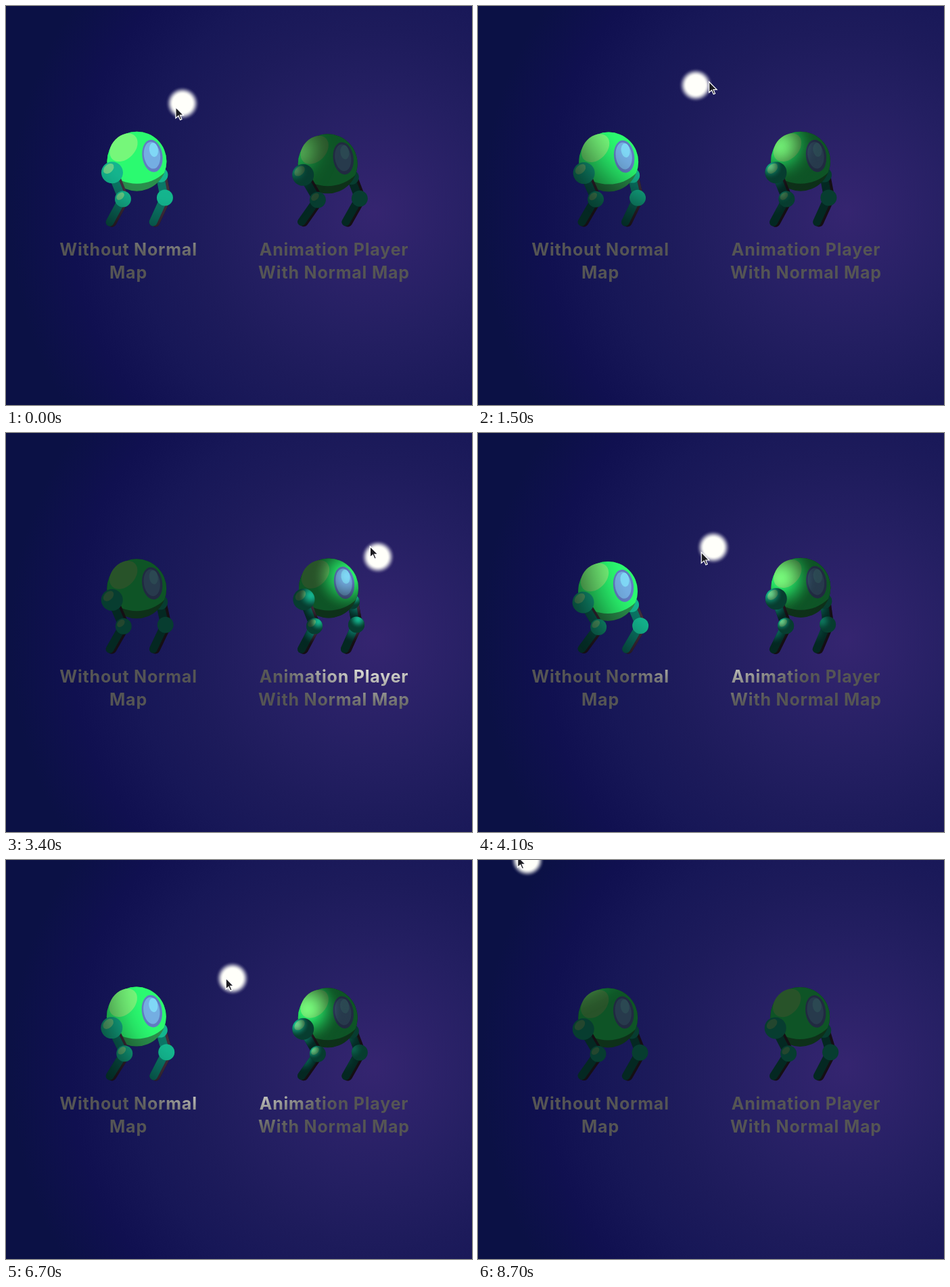
Animation, 689 px wide and 590 px high, one loop 8.8 s. Source, as an HTML page with a canvas:

```html
<!DOCTYPE html>
<html lang="en">
<head>
<meta charset="utf-8">
<title>Normal map light demo</title>
<style>
  html, body { margin: 0; width: 100%; height: 100%; overflow: hidden; background: #0b1145; }
  canvas { display: block; }
</style>
</head>
<body>
<canvas id="stage" width="689" height="590"></canvas>
<script>
const W = 689, H = 590, LOOP = 8800, STEP = 100;
const AMBIENT = .335, LEAD = .045;
const stage = document.getElementById('stage').getContext('2d');
const makeLayer = () => Object.assign(document.createElement('canvas'), { width: W, height: H }).getContext('2d');
const backdrop = makeLayer(), litLayer = makeLayer();

// Colours in full light; shadow is the same colour times AMBIENT
const MAT = {
  body: [43, 250, 112],
  shine: [118, 247, 122],
  belly: [42, 142, 76],
  rim: [98, 124, 194],
  glass: [116, 174, 226],
  glint: [128, 216, 246],
  joint: [20, 181, 142],
  spot: [104, 208, 136],
  leg: [11, 118, 102],
  shade: [64, 46, 60],
  text: [255, 255, 250]
};

// Turning points of the light: seconds, x, y
const PATH = [
  [0, 261, 144], [.9, 70, 255], [1.5, 322, 117], [1.9, 490, 125], [2.6, 613, 279],
  [3.1, 610, 270], [3.7, 470, 105], [4.1, 348, 169], [4.6, 150, 240], [5.3, 358, 111],
  [6, 588, 180], [6.45, 310, 215], [6.7, 335, 175], [7.4, 130, 200], [8, 310, 80], [8.7, 73, 0]
];

const smooth = (from, to, v) => {
  const u = Math.min(1, Math.max(0, (v - from) / (to - from)));
  return u * u * (3 - 2 * u);
};
const rgb = c => `rgb(${c.join(',')})`;
const white = a => `rgba(255,255,250,${a})`;
const shaded = (m, k) => rgb(MAT[m].map(v => Math.round(v * (AMBIENT + (1 - AMBIENT) * k))));

function slope(i, k) {
  const a = PATH[Math.max(i - 1, 0)], b = PATH[Math.min(i + 1, PATH.length - 1)];
  return (b[k] - a[k]) / (b[0] - a[0]);
}

function alongPath(t) {
  let i = 0;
  while (i < PATH.length - 2 && t >= PATH[i + 1][0]) i++;
  const a = PATH[i], b = PATH[i + 1], d = b[0] - a[0], u = (t - a[0]) / d;
  return [1, 2].map(k => {
    const m = slope(i, k) * d, n = slope(i + 1, k) * d, rise = b[k] - a[k];
    return a[k] + u * (m + u * (3 * rise - 2 * m - n + u * (m + n - 2 * rise)));
  });
}

const bob = cycles => Math.cos(2 * Math.PI * cycles);

// Radial gradient sampled from a function of the distance
function radial(c, x, y, r, colorAt, steps = 12) {
  const g = c.createRadialGradient(x, y, 0, x, y, r);
  for (let i = 0; i <= steps; i++) g.addColorStop(i / steps, colorAt(r * i / steps));
  return g;
}

// Painters give the paint for a material on a rounded part at (x, y) of radius r
const shadowed = m => shaded(m, 0);
const flatLit = m => shaded(m, 1);
const normalLit = (lx, ly) => (m, x, y, r) => {
  const a = Math.atan2(ly - y, lx - x), reach = r * 1.2;
  return radial(stage, x + Math.cos(a) * r * .75, y + Math.sin(a) * r * .75, reach,
    d => shaded(m, 1 - smooth(0, reach, d)));
};

function oval(c, paint, x, y, rx, ry = rx, turn = 0) {
  c.fillStyle = paint;
  c.beginPath();
  c.ellipse(x, y, rx, ry, turn, 0, 2 * Math.PI);
  c.fill();
}

function limb(c, paint, [x1, y1], [x2, y2]) {
  const line = (m, dx, width) => {
    c.strokeStyle = paint(m, (x1 + x2) / 2, (y1 + y2) / 2, 18);
    c.lineWidth = width;
    c.beginPath();
    c.moveTo(x1 + dx, y1);
    c.lineTo(x2 + dx, y2);
    c.stroke();
  };
  line('shade', 2, 14);
  line('leg', -1, 12);
}

function leg(c, paint, hip, knee, foot, front) {
  const ball = ([x, y], r) => {
    oval(c, paint('joint', x, y, r), x, y, r);
    if (front) oval(c, paint('spot', x, y, r), x - r * .32, y - r * .36, r * .56, r * .38, -.75);
  };
  limb(c, paint, hip, knee);
  limb(c, paint, knee, foot);
  ball(knee, 12);
  ball(hip, front ? 16 : 11);
}

function walker(c, paint, ox, q) {
  const x = 193 + ox - q, y = 231 + 3 * q, r = 44;
  const skin = m => paint(m, x, y, r);
  leg(c, paint, [x + 35, y + 20], [236.5 + ox + 3.7 * q, 284 + q], [219 + ox + q, 319.5], false);

  oval(c, skin('belly'), x, y, r);
  c.save();
  c.beginPath();
  c.arc(x, y - 26, 59, 0, 2 * Math.PI);
  c.clip();
  oval(c, skin('body'), x, y, r);
  c.restore();
  oval(c, skin('shine'), x - 19.5, y - 20.5, 24, 17, -.8);
  oval(c, skin('rim'), x + 23, y - 8, 15, 24, -.14);
  oval(c, skin('glass'), x + 22.5, y - 9, 12, 20, -.14);
  oval(c, skin('glint'), x + 25, y - 17, 6.5, 10.5, -.14);

  leg(c, paint, [x - 36.5, y + 16.5], [174.5 + ox + 3.7 * q, 286 + q], [154.5 + ox, 319.5 - q / 2], true);
}

function captions(c, paint) {
  c.fillStyle = paint;
  c.font = '700 25px Inter, sans-serif';
  c.letterSpacing = '0.8px';
  c.textAlign = 'center';
  c.fillText('Without Normal', 181, 369);
  c.fillText('Map', 181, 403);
  c.fillText('Animation Player', 485, 369);
  c.fillText('With Normal Map', 485, 403);
}

function scene(c, leftPaint, rightPaint, t) {
  c.lineCap = 'round';
  walker(c, leftPaint, 0, bob(.68 + 1.06 * t));
  walker(c, rightPaint, 283.5, bob(.11 + 1.045 * t));
  captions(c, leftPaint('text'));
}

const ARROW = new Path2D('M0 0V16L4 12.5L6.7 18.5L9 17.5L6.5 11.6H11.5Z');
function pointer(c, x, y) {
  c.save();
  c.translate(x, y);
  c.fillStyle = '#1d1d22';
  c.strokeStyle = '#fff';
  c.lineWidth = 1.2;
  c.fill(ARROW);
  c.stroke(ARROW);
  c.restore();
}

const glow = backdrop.createRadialGradient(545, 305, 0, 545, 305, 540);
['#352570', '#2c2269', '#241f62', '#1d1b5b', '#171757', '#101050', '#0b1145']
  .forEach((color, i, all) => glow.addColorStop(i / (all.length - 1), color));
backdrop.fillStyle = glow;
backdrop.fillRect(0, 0, W, H);

function draw(t) {
  const [x, y] = alongPath(t);
  stage.drawImage(backdrop.canvas, 0, 0);
  scene(stage, shadowed, shadowed, t);

  litLayer.clearRect(0, 0, W, H);
  scene(litLayer, flatLit, normalLit(x, y), t);
  litLayer.globalCompositeOperation = 'destination-in';
  litLayer.fillStyle = radial(litLayer, x, y, 246, d => white(1 - smooth(136, 246, d)), 24);
  litLayer.fillRect(0, 0, W, H);
  litLayer.globalCompositeOperation = 'source-over';
  stage.drawImage(litLayer.canvas, 0, 0);

  oval(stage, radial(stage, x, y, 25, d => white(1 - smooth(14, 25, d))), x, y, 25);
  pointer(stage, ...alongPath(t + LEAD));
}

let start;
function tick(now) {
  start ??= now;
  draw(Math.floor(((now - start) % LOOP) / STEP) * STEP / 1000);
  requestAnimationFrame(tick);
}
requestAnimationFrame(tick);
</script>
</body>
</html>
```
